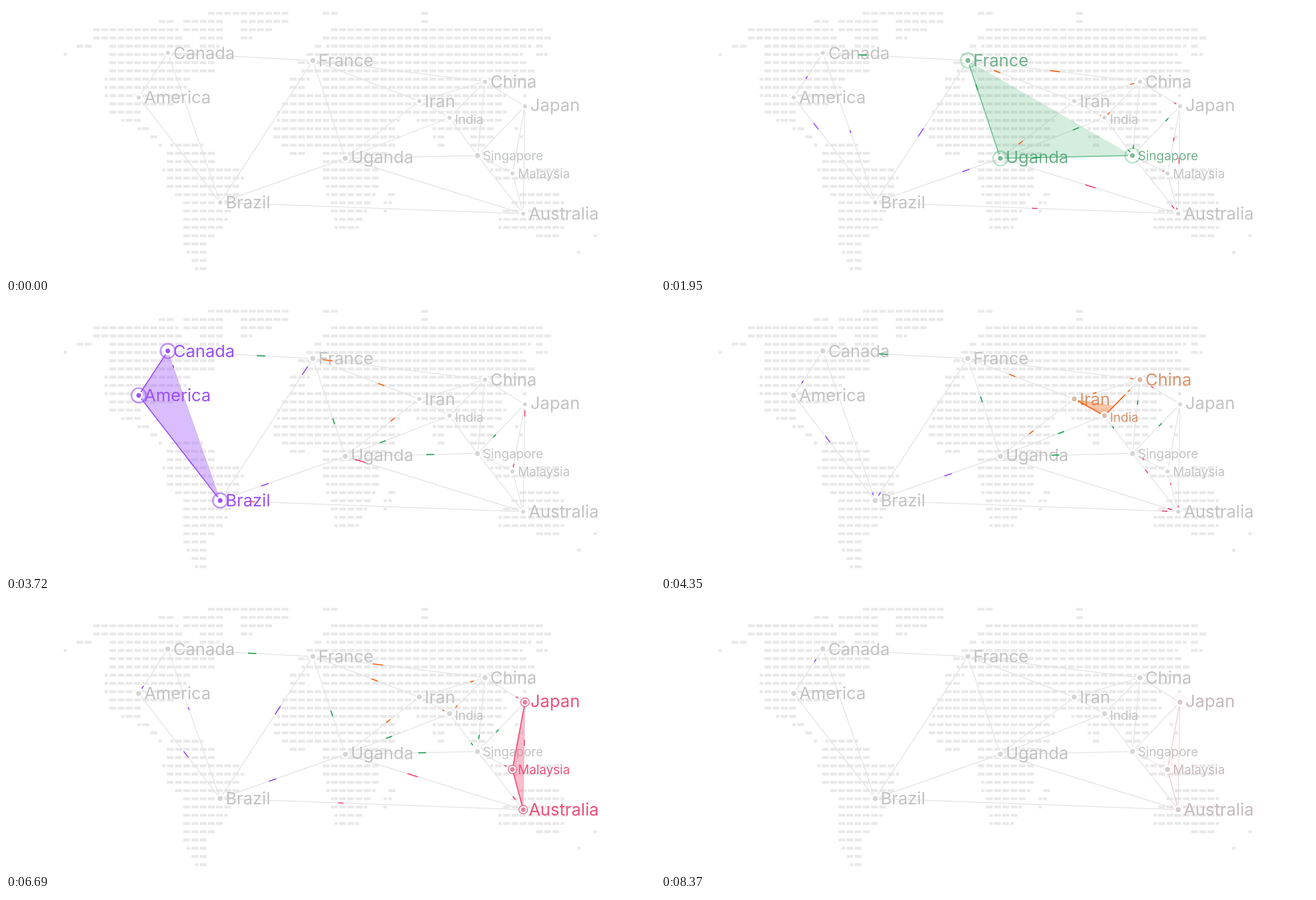
An HTML page with a canvas that plays this animation: 1159x483 px, repeating every 8400 ms.

```html
<!DOCTYPE html>
<html lang="en">
<head>
<meta charset="utf-8">
<title>World network</title>
<style>
html, body { margin: 0; width: 100%; height: 100%; overflow: hidden; background: #fff; }
canvas { display: block; width: 1159px; height: 483px; }
</style>
</head>
<body>
<canvas id="c" width="1159" height="483"></canvas>
<script>
const ctx = document.getElementById('c').getContext('2d');
const LOOP = 8400, PHASE = 2100;
const TEXT = [195, 195, 195], DOT = [214, 214, 214];

// Rough outlines; the dashes of the map fill them.
const outlines = {
  northAmerica: 'M155 36H303L343 87 372 98V122L335 126 301 180 243 184 237 208 256 216 280 252H272L255 228 214 210 186 194 174 138 187 118 184 66 155 64Z',
  arctic: 'M405 6H505L503 34 419 64V22H386V60L375 92 345 76V50L317 48V20H358L362 6ZM272 22H297V34H272Z',
  alaska: 'M126 66H153V78H126ZM102 80H110V92H102Z',
  southAmerica: 'M292 243H343L374 260V285H411L429 300 414 344H400V374L371 416 357 420V476H337L316 418V345L287 328 278 293Z',
  eurasia: 'M566 50L584 36H960L974 62 946 66 915 92 943 108V124L910 140 886 172 900 184 885 205 868 216 872 238 856 254H829V226H784V254H771L758 212 710 198 695 218 708 238',
  africa: 'L664 285V330L637 386 623 402H588L566 300V256H534V268H508L480 238 481 200 508 152V124H533L519 100 537 80H566L580 66H566Z',
  mediterranean: 'M548 126H567V152H533Z',
  north: 'M566 6H592V18H566ZM744 6H755V34H744ZM549 66H562V78H549ZM947 66H957L970 92H947Z',
  japan: 'M925 138H945L930 166H920ZM907 212H917L924 240H916Z',
  indonesia: 'M848 258H858L872 286 899 288 916 302H985V314H874ZM949 287H987V300H949Z',
  madagascar: 'M683 330H695L681 374H669Z',
  australia: 'M920 330H987L1003 362V386L984 417H947V402H881V374L902 346Z',
  newZealand: 'M1050 406H1056V416H1050ZM1020 435H1028V445H1020Z'
};

// x, y, vertical shift of the label
const nodes = {
  France: [548, 97.5], Uganda: [606, 272.5, -2], Singapore: [842, 267.5],
  Canada: [289, 84], America: [237, 163.5], Brazil: [382.5, 351.5],
  Iran: [738, 170], India: [792, 199.8, 3], China: [855.3, 135.3],
  Japan: [926.8, 179.3, -2], Malaysia: [904.5, 299.5], Australia: [923.7, 371.5]
};
const small = ['India', 'Singapore', 'Malaysia'];

// Each group lights up in turn. Routes: trips per loop, then links "from-to".
const groups = [
  { color: [31, 161, 86], names: ['France', 'Uganda', 'Singapore'], routes: [
    { trips: 3, links: 'France-Canada Uganda-France Singapore-Uganda Uganda-India Singapore-Japan' },
    { trips: 9, links: 'Singapore-India Singapore-China' }] },
  { color: [155, 81, 246], names: ['Canada', 'America', 'Brazil'], routes: [
    { trips: 3, links: 'Brazil-America Brazil-Uganda' },
    { trips: 3, links: 'America-Canada', delay: 790 },
    { trips: 2, links: 'Brazil-France' },
    { trips: 2, links: 'Brazil-Canada', size: 0.018 }] },
  { color: [243, 104, 24], names: ['Iran', 'India', 'China'], routes: [
    { trips: 3, links: 'Iran-France Iran-Uganda' },
    { trips: 2, links: 'China-France' },
    { trips: 9, links: 'China-Iran India-China India-Iran' }] },
  { color: [240, 80, 122], names: ['Japan', 'Malaysia', 'Australia'], routes: [
    { trips: 2, links: 'Japan-Malaysia Australia-Japan Australia-Uganda' },
    { trips: 2, links: 'Australia-Brazil', size: 0.018 },
    { trips: 9, links: 'Japan-China Malaysia-Singapore Australia-Singapore Australia-Malaysia' }] }
];

const links = groups.flatMap(({ color, routes }) => routes.flatMap(route =>
  route.links.split(' ').map(link => ({ ...route, color, ends: link.split('-').map(n => nodes[n]) }))));

const clamp = v => Math.max(0, Math.min(1, v));
const ramp = (t, a, b) => clamp((t - a) / (b - a));
const rgb = (c, a = 1) => `rgba(${c.map(Math.round)},${a})`;
const mix = (a, b, k) => a.map((v, i) => v + (b[i] - v) * k);
const along = (a, b, k) => [a[0] + (b[0] - a[0]) * k, a[1] + (b[1] - a[1]) * k];

// Rows of dashes, tested by halves so that coasts can end on a short one.
function buildLand() {
  const area = new Path2D(Object.values(outlines).join(''));
  const land = new Path2D();
  for (let row = 0; row < 32; row++) {
    const y = 13 + 14.74 * row;
    for (let half = 0; half < 140; half++) {
      const x = 38.3 + 14.65 * (half >> 1) + 6 * (half % 2);
      if (ctx.isPointInPath(area, x + 3, y, 'evenodd')) land.rect(x, y - 2.6, 6, 5.2);
    }
  }
  return land;
}
const land = buildLand();

function stroke(points, color, width) {
  ctx.beginPath();
  points.forEach(p => ctx.lineTo(p[0], p[1]));
  ctx.strokeStyle = color;
  ctx.lineWidth = width;
  ctx.stroke();
}

function circle(x, y, r) {
  ctx.beginPath();
  ctx.arc(x, y, r, 0, 7);
}

function disc(x, y, r, color) {
  circle(x, y, r);
  ctx.fillStyle = color;
  ctx.fill();
}

// Part of a three-point path, up to a share of its length.
function partial([a, b, c], share) {
  const ab = Math.hypot(b[0] - a[0], b[1] - a[1]);
  const bc = Math.hypot(c[0] - b[0], c[1] - b[1]);
  const d = share * (ab + bc);
  return d < ab ? [a, along(a, b, d / ab)] : [a, b, along(b, c, (d - ab) / bc)];
}

function drawArea(group, t, fade) {
  const path = group.names.map(n => nodes[n]);
  const p = ramp(t, 0, 300);
  ctx.beginPath();
  partial(path, ramp(t, 0, 265)).forEach(q => ctx.lineTo(q[0], q[1]));
  ctx.fillStyle = rgb(group.color, 0.38 * fade);
  ctx.fill();
  stroke(partial(path, 1 - (1 - p) ** 2), rgb(group.color, fade), 2);
}

function drawStreak({ ends: [a, b], trips, color, delay = 0, size = 0.058 }, t) {
  if (t < delay) return;
  const tail = (t - delay) * trips / LOOP % 1;
  const head = Math.min(1, tail + Math.min(size, 0.6 * tail));
  stroke([along(a, b, tail), along(a, b, head)], rgb(color), 2);
}

function drawLabel(name, color, lit) {
  const [x, y, shift = 0] = nodes[name];
  const size = small.includes(name) ? 22.4 : 30.4;
  ctx.font = size + 'px Inter, "Liberation Sans", sans-serif';
  ctx.fillStyle = rgb(mix(TEXT, color, lit));
  ctx.fillText(name, x + 9.7, y + shift + size * 0.36);
}

function drawNode(name, color, t, fade) {
  const [x, y] = nodes[name];
  const active = t >= 0 && t < PHASE;
  const lit = active ? ramp(t, 0, 640) * fade : 0;
  disc(x, y, 7.5, '#fff');
  disc(x, y, t < 0 ? 3.6 : 4.5 - 0.3 * lit, rgb(mix(DOT, color, lit)));
  if (!active) return;
  const grow = ramp(t, 240, 660);
  circle(x, y, 4.5 + 8.5 * grow);
  ctx.strokeStyle = rgb(color, (0.85 - 0.27 * grow) * fade * ramp(t, 240, 320));
  ctx.lineWidth = 1.2 + 1.9 * grow;
  ctx.stroke();
}

function draw(t) {
  ctx.fillStyle = '#fff';
  ctx.fillRect(0, 0, 1159, 483);
  ctx.fillStyle = '#e9e9e9';
  ctx.fill(land);
  links.forEach(link => stroke(link.ends, '#e3e3e3', 1.4));

  const now = Math.floor(t / PHASE), local = t % PHASE;
  const fade = 1 - ramp(local, 1800, PHASE);
  groups.forEach((g, i) => {
    const lit = i === now ? ramp(local, 0, 300) * fade : 0;
    g.names.forEach(n => drawLabel(n, g.color, lit));
  });
  drawArea(groups[now], local, fade);
  links.forEach(link => drawStreak(link, t));
  groups.forEach((g, i) => g.names.forEach(n => drawNode(n, g.color, t - i * PHASE, fade)));
}

const start = performance.now();
function frame() {
  draw((performance.now() - start) % LOOP);
  requestAnimationFrame(frame);
}
frame();
</script>
</body>
</html>
```
